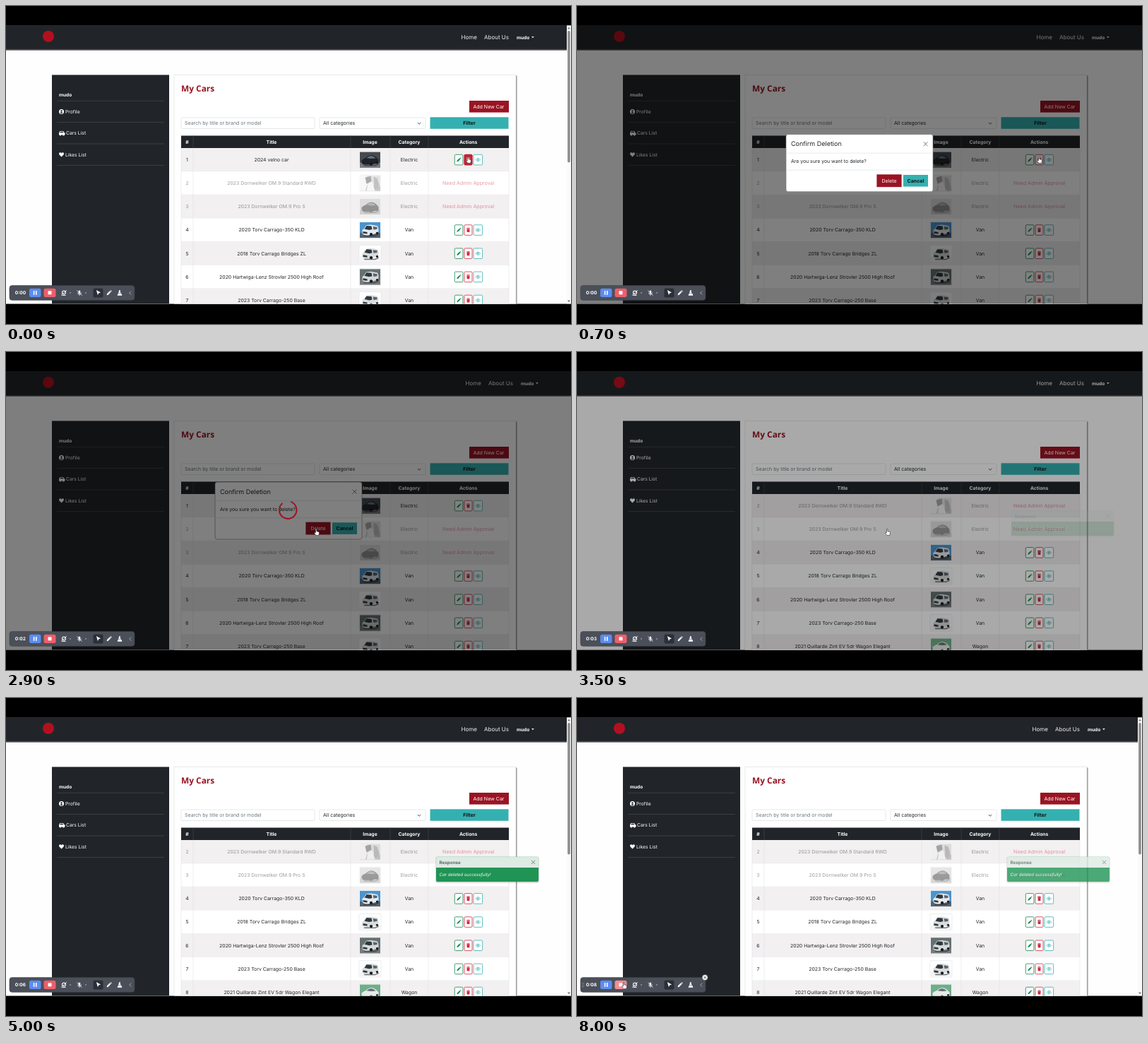
These frames come from a looping animation (800x450 px, 8100 ms). An HTML page:

```html
<!DOCTYPE html>
<html lang="en">
<head>
<meta charset="utf-8">
<title>My Cars</title>
<style>
  html, body { margin: 0; width: 100%; height: 100%; overflow: hidden; background: #000; }
  svg { display: block; width: 100%; height: 100%; }
  text { font-family: Inter, sans-serif; text-rendering: geometricPrecision; white-space: pre; }
  .title { font-family: 'Noto Sans', sans-serif; font-weight: 600; }
</style>
</head>
<body>
<svg id="stage" viewBox="0 0 800 450"></svg>
<script>
const LOOP = 8100;
const DARK = '#212529', RED = '#9a1423', TEAL = '#35b0b0', LINE = '#dee2e6';

const rect = (x, y, w, h, fill, more = '') =>
  `<rect x="${x}" y="${y}" width="${w}" height="${h}" fill="${fill}" ${more}/>`;
const path = (d, fill, more = '') => `<path d="${d}" fill="${fill}" ${more}/>`;
const stroke = (d, color, width = .7, more = '') =>
  path(d, 'none', `stroke="${color}" stroke-width="${width}" ${more}`);
const circle = (x, y, r, fill, more = '') => `<circle cx="${x}" cy="${y}" r="${r}" fill="${fill}" ${more}/>`;
const label = (x, y, s, size = 6.9, fill = DARK, more = '') =>
  `<text x="${x}" y="${y}" font-size="${size}" fill="${fill}" ${more}>${s}</text>`;
const MID = 'text-anchor="middle"', BOLD = 'font-weight="700"', MIDBOLD = MID + ' ' + BOLD;
const at = (x, y, body, more = '') => `<g transform="translate(${x} ${y})" ${more}>${body}</g>`;
const group = (id, body, more = '') => `<g id="${id}" ${more}>${body}</g>`;
const cross = (x, y, r, color) => stroke(`M${x - r} ${y - r}l${2 * r} ${2 * r}m0 ${-2 * r}l${-2 * r} ${2 * r}`, color, .8);

const PENCIL = 'M-2.8 2.8l.5-1.9 3.3-3.3 1.4 1.4-3.3 3.3zM1.5-2.8l.6-.6 1.4 1.4-.6.6z';
const TRASH = 'M-2.4-2.8h1.5l.4-.5h1l.4.5h1.5v.8h-4.8zM-2.1-1.6h4.2l-.3 4.6h-3.6z';
const ARROW = 'M-2.6-4l6.3 3.5-2.8.8-1.5 2.6z';
const HAND = 'M-1.6-4.3q.8-.8 1.5 0v3l2.8.7q1 .3.8 1.5l-.6 3.5h-4l-2.3-3q-.2-1.2 1-.9l.8.6z';

// id, title, category, pending, [sky, ground, body], body style
const cars = [
  [1, '2024 velno car', 'Electric', 0, ['#454b50', '#77797b', '#202428'], 'suv'],
  [2, '2023 Dornwelker OM.9 Standard RWD', 'Electric', 1, ['#c4c4c4', '#8b8b8b', '#444'], 'cabin'],
  [3, '2023 Dornwelker OM.9 Pro S', 'Electric', 1, ['#c8c8c8', '#aaa', '#222'], 'suv'],
  [4, '2020 Torv Carrago-350 KLD', 'Van', 0, ['#4a94cf', '#56636d', '#e3e9ee'], 'van'],
  [5, '2018 Torv Carrago Bridges ZL', 'Van', 0, ['#fdfdfd', '#f4f4f4', '#d9dcde'], 'van'],
  [6, '2020 Hartwiga-Lenz Strovler 2500 High Roof', 'Van', 0, ['#65716f', '#777b7c', '#d5d9da'], 'van'],
  [7, '2023 Torv Carrago-250 Base', 'Van', 0, ['#fdfdfd', '#f4f4f4', '#dadcdd'], 'van'],
  [8, '2021 Quillarde Zint EV 5dr Wagon Elegant', 'Wagon', 0, ['#6fae88', '#68776e', '#e6ebe8'], 'suv'],
];

function photo([sky, ground, body], style) {
  const frame = rect(-15.5, -11.8, 31, 23.6, '#fff', `rx="1" stroke="${LINE}" stroke-width=".6"`) +
    rect(-14.5, -11, 29, 22, sky) + rect(-14.5, 4, 29, 7, ground);
  if (style === 'cabin') {
    return frame + path('M-14.5-11h9l3 7-4 15h-8z', '#eee') + path('M-3 1l6-3 4 13H-5z', '#eee') +
      path('M-7-8l8-2 1 7-7 4z', body) + path('M5-9l5 2 3 9-2 6H6z', '#777');
  }
  const shape = style === 'van'
    ? path('M-11 0Q-8-2-6-6Q-4-7.500 1-7.500L10-6Q12-5 12 2L8 5-4 8Q-11 7-11 4z', body) +
      path('M-8-1.500L-5-6l7 .5 1 4.500-4 1z', '#30383f') + path('M4-5l6 .8v3l-5 .8z', '#5a636a') +
      path('M-10 2l6 1v2.500l-6-.8z', '#30363b')
    : path('M-12 1Q-9-2-6-2.500Q-3-6 2-6.500Q7-6 10-2L12 0v5L2 7H-9Q-12 6-12 3z', body) +
      path('M-5-2.300Q-2-5.500 2-5.500Q6-5 8-2L2-1.500z', '#66717a');
  return frame + shape + path('M-9 7.500h16l5-2.500v2L7 9H-8z', '#22262a', 'opacity=".6"') +
    circle(1.5, 6, 2.1, '#15181a') + circle(10, 4.2, 1.6, '#15181a');
}

function actions(y, hot) {
  const button = (x, w, color, icon, fill = '#fff') =>
    rect(x, y - 7.3, w, 14.6, fill, `rx="1.3" stroke="${color}" stroke-width=".8"`) + at(x + w / 2, y, icon);
  const trash = '#cf2c3f';
  return button(635.3, 11.6, '#198754', path(PENCIL, '#198754')) +
    button(649, 11, trash, path(TRASH, trash)) +
    (hot ? group('hotTrash', button(649, 11, '#b91f32', path(TRASH, '#fff'), '#c22436')) : '') +
    button(662, 12.6, TEAL, stroke('M-3.2 0Q0-4.4 3.2 0Q0 4.4-3.2 0z', TEAL, .8) + circle(0, 0, 1.1, TEAL));
}

function row([id, title, category, pending, tones, style], i) {
  const y = 217.6 + i * 33.15, base = y + 2.4, faded = pending ? 'opacity=".45"' : '';
  return rect(248, y - 16.6, 464, 33.15, i % 2 ? '#fff' : '#f2f0f1') +
    stroke(`M248 ${y + 16.5}h464`, LINE, .6) +
    `<g ${faded}>` + label(256.5, base, id, 6.9, DARK, MID) + label(376, base, title, 6.9, DARK, MID) +
    at(515.5, y, photo(tones, style)) + label(571, base, category, 6.9, DARK, MID) +
    (pending ? label(654.7, base, 'Need Admin Approval', 7.1, '#c8203f', MID) : '') + '</g>' +
    (pending ? '' : actions(y, id === 1));
}

const navbar = rect(0, 61, 800, 2, '#777') + rect(0, 27, 800, 34.5, DARK) +
  circle(60, 43, 8, '#b3101f') +
  group('links', label(644.5, 47, 'Home', 8, '#eee') + label(677, 47, 'About Us', 8, '#eee') +
    label(723, 46.7, 'mudo', 6.6, '#fff', BOLD) + path('M744 43.3h3.8l-1.9 2z', '#fff'));

const sidebar = rect(65, 97.5, 166, 324, DARK) +
  [134.3, 164.5, 195, 225.5].map(y => stroke(`M72 ${y}h152`, '#45494d', .7)).join('') +
  label(75, 128, 'mudo', 6.6, '#fff', BOLD) +
  label(84, 152, 'Profile', 6.8, '#fff') + label(85, 182.4, 'Cars List', 6.8, '#fff') + label(84, 212.8, 'Likes List', 6.8, '#fff') +
  at(78.5, 149.5, circle(0, 0, 3.5, '#fff') + circle(0, -1, 1.2, DARK) + path('M-2 2q2-2.4 4 0q-2 1.5-4 0z', DARK)) +
  at(79, 180, path('M-2.8-3h5l1.3 2.3 1 .5v2.5h-8.5v-2.5z', '#fff') +
    path('M-2.2-2.2h3.8l.8 1.5h-5.2z', DARK) + circle(-2, 2.2, 1.3, '#fff') + circle(2.5, 2.2, 1.3, '#fff')) +
  at(78.5, 210.2, path('M0 3.2L-3.2 0Q-4-2.8-1.7-2.9Q-.5-2.8 0-1.8Q.5-2.8 1.7-2.9Q4-2.8 3.2 0z', '#fff'));

const columns = [[256.5, '#'], [376, 'Title'], [515.5, 'Image'], [571, 'Category'], [654.7, 'Actions']];
const panel = rect(239.5, 98.5, 484, 330, '#8b8b8b') + rect(238, 97.5, 484, 330, '#fff', 'stroke="#ddd" stroke-width=".6"') +
  label(248, 120.7, 'My Cars', 11.9, RED, 'class="title"') +
  rect(656, 134, 56, 16.6, RED) + label(683.5, 144.8, 'Add New Car', 7, '#fff', MID) +
  rect(248, 158, 189, 15.5, '#fff', `rx="1.5" stroke="${LINE}" stroke-width=".8"`) +
  label(253, 168.2, 'Search by title or brand or model', 7, '#6c757d') +
  rect(444, 158, 150, 15.5, '#fff', `rx="1.5" stroke="${LINE}" stroke-width=".8"`) +
  label(449, 168.2, 'All categories', 7) + stroke('M583 165l2.2 2.2 2.2-2.2', '#343a40', .9) +
  rect(600.5, 157.3, 111, 16.5, TEAL) + label(656, 168, 'Filter', 7, '#101315', MIDBOLD) +
  group('before', cars.slice(0, 7).map(row).join('')) + group('after', cars.slice(1).map(row).join('')) +
  [248, 265, 488, 544, 598, 712].map(x => stroke(`M${x} 201V424`, LINE, .6)).join('') +
  rect(248, 183.5, 464, 17.5, DARK) +
  columns.map(([x, s]) => label(x, 194.7, s, 6.8, '#fff', MIDBOLD)).join('') +
  [265, 488, 544, 598].map(x => stroke(`M${x} 183.5v17.5`, '#42474c', .6)).join('');

const scrollbar = rect(794, 27.5, 6, 394, '#fafafa') + rect(795.2, 35, 3.6, 186.5, '#8d8d8d', 'rx="1.8"') +
  path('M795 32.5h4l-2-2.8z', '#777') + path('M795 416.5h4l-2 2.8z', '#777');

const modal = rect(296, 184, 208, 81, '#fff', 'rx="3" stroke="#777" stroke-width=".6"') +
  label(303, 200.6, 'Confirm Deletion', 9) + cross(493.6, 197.6, 2.9, '#555') +
  stroke('M296 210.5h208M296 234.5h208', LINE) +
  label(303, 224.8, 'Are you sure you want to delete?', 6.9) +
  rect(425, 241.3, 34, 16.6, RED, 'id="deleteBox" stroke-width="1.2"') + label(442, 252, 'Delete', 7, '#fff', MID + ' id="deleteText"') +
  rect(462, 241.3, 35, 16.6, TEAL) + label(479.5, 252, 'Cancel', 7, '#101315', MIDBOLD);

const toast = rect(608, 225, 147, 37, '#000', 'rx="3" opacity=".13"') +
  rect(609, 224.7, 145, 35.2, '#1f9455', 'rx="2"') + path('M609 240v-13q0-2.3 2.3-2.3h140.4q2.3 0 2.3 2.3v13z', '#dcebe3') +
  label(613.5, 234.8, 'Response', 6.3, '#59665f', BOLD) + cross(746.5, 232.4, 2.6, '#59665f') +
  label(613.5, 252.3, 'Car deleted successfully!', 6.1, '#fff', 'font-style="italic"');

const caret = x => path(`M${x - 1.3} 405.5h2.6l-1.3 1.5z`, '#b8bcc4');
const toolbar = rect(5, 395.5, 177, 20.8, '#4a4f59', 'rx="3.5" stroke="#3b4048" stroke-width=".6"') +
  label(12.7, 408.2, '0:00', 6.6, '#fff', BOLD + ' id="timer"') +
  rect(33, 399.8, 16.5, 12.2, '#5b8df0', 'rx="2.5"') + rect(38.8, 403, 1.6, 5.8, '#fff') + rect(42, 403, 1.6, 5.8, '#fff') +
  rect(53.5, 399.8, 17, 12.2, '#ec5f6a', 'rx="2.5" id="stop"') + rect(59.5, 403.3, 5, 5, '#fff', 'rx=".6"') +
  at(82, 406, circle(0, -.5, 2.5, 'none', 'stroke="#fff" stroke-width="1.1"') + stroke('M-2.5 3.5h5M-3.8 3.5L3.8-3.8', '#fff', .9)) +
  at(104, 406, rect(-1.2, -3.6, 2.4, 4.8, '#fff', 'rx="1.2"') + stroke('M-2.4-.5Q-2.4 2.2 0 2.2Q2.4 2.2 2.4-.5M0 2v1.7M-3.5-3.5l7 7', '#fff', .8)) +
  caret(91) + caret(113) + rect(123.5, 399.5, 14, 13, '#2b3038', 'rx="2"') +
  at(130.5, 406, path(ARROW, '#fff')) + at(145.8, 406, path(PENCIL, '#fff', 'transform="scale(1.15)"')) +
  at(161, 406, path('M-.7-4h1.4v2.5l1.3 2h-4zM-2.5 1h5l.8 2.7h-6.6z', '#fff')) + stroke('M177.2 403.5l-2.5 2.5 2.5 2.5', '#b8bcc4', .8) +
  group('hoverBits', circle(181.2, 395.5, 4, '#f4f4f4', 'stroke="#444" stroke-width=".6"') + cross(181.2, 395.5, 1.4, '#333') +
    [403.5, 406, 408.5].map(y => circle(7.4, y, .6, '#aaa') + circle(9.4, y, .6, '#aaa')).join(''));

const stage = document.getElementById('stage');
stage.innerHTML = '<clipPath id="view"><rect y="27" width="800" height="394.4"/></clipPath>' +
  rect(0, 0, 800, 450, '#000') +
  '<g clip-path="url(#view)">' + rect(0, 28, 800, 394, '#fefefe') + navbar + sidebar + panel +
  group('scroll', scrollbar) + group('toast', toast) +
  rect(0, 27, 800, 395, '#000', 'id="dimUnder"') + group('modal', modal) +
  rect(0, 27, 800, 395, '#000', 'id="dimOver"') +
  stroke('M403 211.9A12.3 12.3 0 1 1 391.5 214', '#a01222', 2, 'id="spinner"') +
  toolbar + group('cursor', path(HAND, '#fff', 'stroke="#222" stroke-width=".6"')) + '</g>';

const parts = {};
for (const el of stage.querySelectorAll('[id]')) parts[el.id] = el;
const set = (id, name, value) => parts[id].setAttribute(name, value);
const show = (id, alpha) => set(id, 'opacity', Number(alpha));
const move = (id, x, y) => set(id, 'transform', `translate(${x} ${y})`);
const ramp = (t, a, b) => Math.min(1, Math.max(0, (t - a) / (b - a)));
const smooth = p => p * p * (3 - 2 * p);
const ticks = [1300, 2300, 3300, 3700, 4000, 5000, 6000, 7000];

function draw(now) {
  const t = Math.floor(now % LOOP / 100) * 100; // the screen refreshes ten times a second
  const locked = t >= 400 && t < 3650;
  const busy = t >= 2700 && t < 3400;
  const deleted = t >= 3400;
  const dim = .5 * Math.min(ramp(t, 375, 530), 1 - ramp(t, 3450, 3605));

  show('scroll', !locked);
  move('links', locked ? 6 : 0, 0);
  show('before', !deleted);
  show('after', deleted);
  show('hotTrash', t < 400);
  show('dimUnder', busy ? 0 : dim);
  show('dimOver', busy ? dim : 0);

  show('modal', ramp(t, 500, 650) * (1 - ramp(t, 3250, 3400)));
  move('modal', 0, -21 * (1 - ramp(t, 500, 800)) ** 2);
  const hover = t >= 1800 && t < 2700;
  set('deleteBox', 'fill', hover ? '#fff' : RED);
  set('deleteBox', 'stroke', hover ? DARK : RED);
  set('deleteText', 'fill', hover ? DARK : '#fff');
  show('spinner', busy);
  set('spinner', 'transform', `rotate(${(t - 2900) * .48} 400 223.8)`);

  show('toast', ramp(t, 3475, 3625) * (1 - .2 * ramp(t, 7900, 8000)));
  move('toast', locked ? 6 : 0, 0);

  const over = t >= 6500;
  const p = smooth(over ? ramp(t, 6500, 7300) : ramp(t, 1000, 1800));
  move('cursor', over ? 105 - 38 * p : 655 - 215 * p, over ? 424 - 17 * p : 218 + 37 * p);
  show('cursor', t < 4000 || over);
  show('hoverBits', t >= 6800);
  set('stop', 'fill', t >= 7200 ? '#f48d94' : '#ec5f6a');
  parts.timer.textContent = '0:0' + ticks.filter(x => t >= x).length;
}

function frame() {
  draw(performance.now());
  requestAnimationFrame(frame);
}
frame();
</script>
</body>
</html>
```
